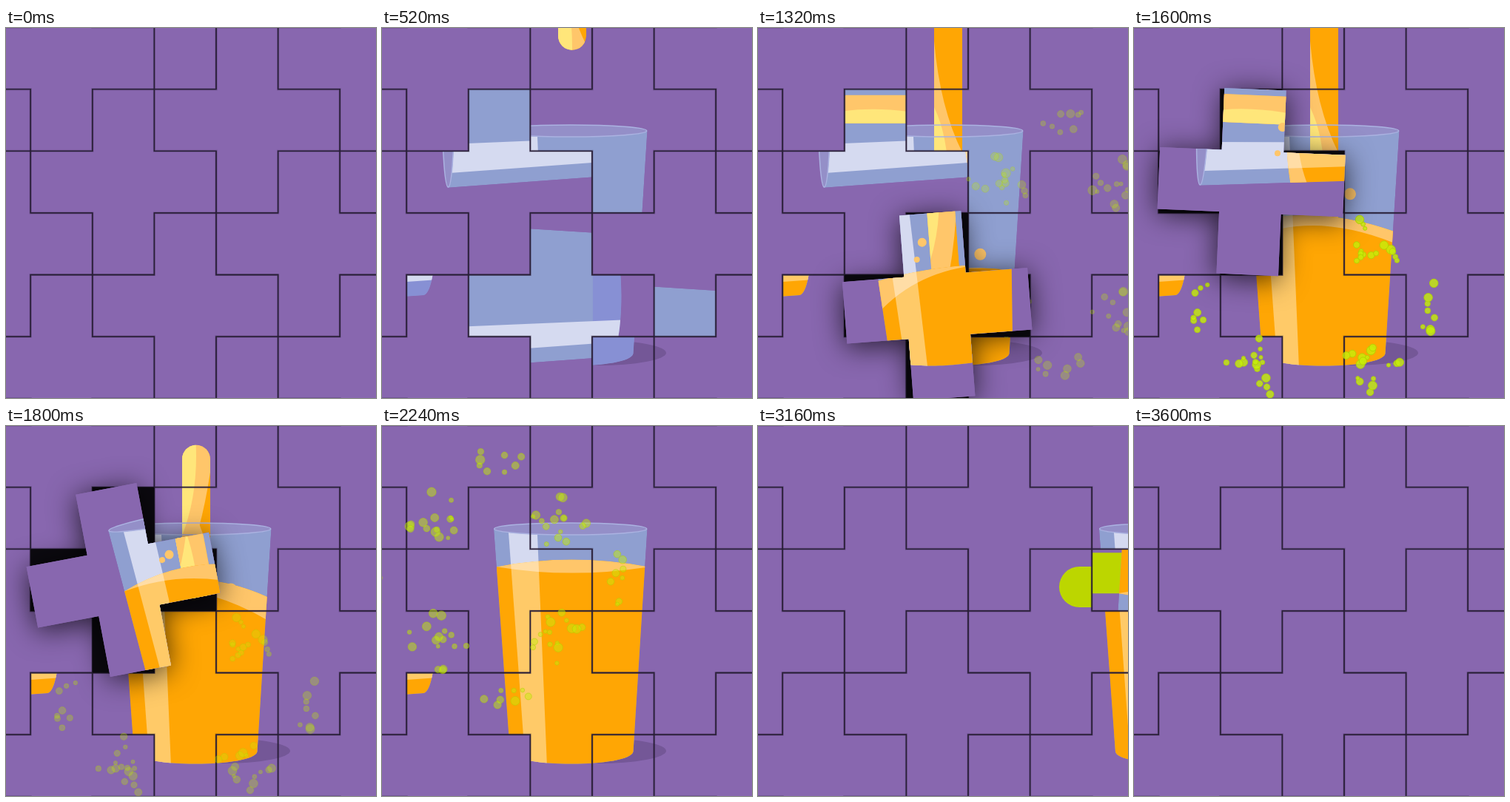
An HTML page with a canvas that plays this animation: 500 by 500 pixels, repeating every 3640 ms.

```html
<!DOCTYPE html>
<html>
<head>
<meta charset="utf-8">
<style>
html, body { margin: 0; height: 100%; overflow: hidden; background: #8867af; }
canvas { display: block; }
</style>
</head>
<body>
<canvas id="stage" width="500" height="500"></canvas>
<script>
const ctx = document.getElementById('stage').getContext('2d');
const LOOP = 3640, U = 83.6, TURN = 400;
const PURPLE = '#8867af', ORANGE = '#ffa604', LIGHT = '#ffc66a', YELLOW = '#ffe67a', LIME = '#bcd600';

const clamp = (v, a = 0, b = 1) => Math.min(b, Math.max(a, v));
const phase = (t, start, length) => clamp((t - start) / length);
const easeOut = p => 1 - (1 - p) ** 3;
const easeInOut = p => p < .5 ? 4 * p ** 3 : 1 - 4 * (1 - p) ** 3;
const random = n => { const s = Math.sin(n * 12.9898) * 43758.5453; return s - Math.floor(s); };

// Tile centre from lattice steps (2,-1) and (1,2).
const centre = (i, j) => ({ x: 158.6 + (2 * i + j) * U, y: 208.1 + (2 * j - i) * U });

const turning = [
  { ...centre(1, 1), start: 522 },
  { ...centre(0, 1), start: 1013 },
  { ...centre(0, 0), start: 1525 }
];
const fixed = [
  { ...centre(-1, 1), angle: -Math.PI / 2 },
  { ...centre(2, 1), angle: Math.PI }
];

function plus() {
  const h = U / 2, e = U * 1.5;
  ctx.beginPath();
  [[-h, -e], [h, -e], [h, -h], [e, -h], [e, h], [h, h], [h, e], [-h, e], [-h, h], [-e, h], [-e, -h], [-h, -h]]
    .forEach(p => ctx.lineTo(...p));
  ctx.closePath();
}

function at(x, y, angle, draw) {
  ctx.save();
  ctx.translate(x, y);
  ctx.rotate(angle);
  draw();
  ctx.restore();
}

function fill(color) {
  ctx.fillStyle = color;
  ctx.fill();
}

function stroke(color, width) {
  ctx.strokeStyle = color;
  ctx.lineWidth = width;
  ctx.stroke();
}

function ellipse(x, y, rx, ry, color) {
  ctx.beginPath();
  ctx.ellipse(x, y, rx, ry, 0, 0, 7);
  fill(color);
}

function pill(x, y, w, h, r) {
  ctx.beginPath();
  ctx.roundRect(x, y, w, h, r);
}

function glassPath() {
  ctx.beginPath();
  ctx.moveTo(151, 139);
  ctx.lineTo(173, 440);
  ctx.bezierCurveTo(176, 462, 336, 462, 339.5, 440);
  ctx.lineTo(358.5, 139);
  ctx.ellipse(254.7, 139, 103.7, 8, 0, 0, Math.PI, true);
}

function highlight(color) {
  ctx.beginPath();
  ctx.moveTo(171, 144);
  ctx.lineTo(210, 147);
  ctx.lineTo(223, 460);
  ctx.lineTo(194, 460);
  fill(color);
}

function glint(top, bottom) {
  const mid = (top + bottom) / 2;
  ctx.beginPath();
  ctx.moveTo(237, top);
  ctx.quadraticCurveTo(244, top + 100, 277, top + 165);
  ctx.lineTo(277, bottom - 150);
  ctx.quadraticCurveTo(264, bottom - 60, 237, bottom);
  fill(LIGHT);
  ctx.beginPath();
  ctx.moveTo(237, mid - 100);
  ctx.quadraticCurveTo(257, mid - 60, 257, mid);
  ctx.quadraticCurveTo(257, mid + 60, 237, mid + 110);
  fill(YELLOW);
}

function stream(t, level) {
  const head = 28 + 1.78 * (t - 520), tail = Math.max(-60, 24 + 1.78 * (t - 1800));
  const end = Math.min(head, level + 25);
  if (end <= tail) return;
  ctx.save();
  pill(238, tail, 38, end - tail, Math.min(19, (end - tail) / 2));
  ctx.clip();
  fill(ORANGE);
  glint(5, 405);
  if (t < 760) glint(head - 170, head + 160);
  if (t > 1700) glint(tail - 150, tail + 180);
  ctx.restore();
}

function juice(t, level) {
  const churn = 1 - phase(t, 1950, 300), shift = phase(t, 1400, 400);
  const tilt = 8 * churn * Math.sin(t / 150);
  const left = level + tilt, right = level - tilt;
  const surface = () => {
    ctx.beginPath();
    ctx.moveTo(155, left);
    ctx.quadraticCurveTo(255, level - 18 - 25 * churn * shift, 357, right);
  };
  ctx.save();
  surface();
  ctx.lineTo(357, 470);
  ctx.lineTo(155, 470);
  ctx.clip();
  fill(ORANGE);
  surface();
  ctx.lineTo(357, right + 32 * churn * shift);
  ctx.quadraticCurveTo(255 - 25 * churn * (1 - shift), level + 18 - 42 * churn, 155, left + 48 * churn * (1 - shift));
  fill(LIGHT);
  highlight('rgba(255,255,255,.4)');
  ctx.restore();
}

function glass(t) {
  const level = 190 + 265 * (1 - phase(t, 840, 1200)) ** 1.2;
  ellipse(292, 439, 92, 17, '#745797');
  if (t > 2280) {
    pill(97 + 620 * (1 - easeOut(phase(t, 2300, 380))), 190, 1500, 55, 27.5);
    fill(LIME);
  }
  ctx.save();
  glassPath();
  ctx.clip();
  fill('#8f9fd0');
  ctx.fillStyle = '#8790d4';
  ctx.fillRect(150, 418, 200, 50);
  highlight('#d5daf0');
  ctx.restore();
  ellipse(254.7, 139, 103, 8, '#948fc8');
  if (t > 490) stream(t, level);
  if (t > 840) {
    ctx.save();
    glassPath();
    ctx.clip();
    juice(t, level);
    ctx.restore();
  }
  if (t > 850 && t < 1850) {
    for (let i = 0; i < 3; i++) {
      const p = (t / 420 + i / 3) % 1;
      ellipse(255 + [-62, -36, 50][i] * (.5 + p / 2), level - 180 * p * (1 - p), 4 + i * 2, 4 + i * 2, LIGHT);
    }
  }
  ctx.beginPath();
  ctx.ellipse(254.7, 139, 103, 8, 0, 0, 7);
  stroke('#abb2e1', 1.5);
}

function scene(t) {
  ctx.fillStyle = PURPLE;
  ctx.fillRect(-400, -400, 1400, 1400);
  if (t < 40 || t > 3310) return;
  const enter = -460 * (1 - easeOut(phase(t, 40, 440)));
  const leave = 640 * phase(t, 2820, 490) ** 2;
  at(enter + leave, 0, 0, () => glass(t));
}

function tile({ x, y }, angle, t) {
  at(x, y, angle, () => {
    plus();
    ctx.clip();
    ctx.translate(-x, -y);
    scene(t);
  });
}

// Drops thrown outwards from every edge of a tile as it snaps home.
function splash({ x, y, start }, t) {
  const age = t - start - TURN;
  if (age < 0 || age > 500) return;
  ctx.globalAlpha = Math.min(1, 1.3 * (1 - age / 500));
  for (let i = 0; i < 96; i++) {
    const n = i + start, side = i % 3 - 1;
    const out = (22 + 32 * random(n)) * easeOut(Math.min(1, (age + 30) / 600));
    const along = (random(n + .3) - .5) * U;
    const size = 2.5 + 3.8 * random(n + .7);
    at(x, y, Math.floor(i / 3) % 4 * Math.PI / 2, () => {
      const px = side ? side * (U / 2 + out) : along;
      const py = side ? along - U : -1.5 * U - out;
      ellipse(px, py, size, size, '#c6ee0a');
      stroke('#aed000', 1);
    });
  }
  ctx.globalAlpha = 1;
}

function grid() {
  for (let i = -3; i <= 3; i++) {
    for (let j = -3; j <= 3; j++) {
      const c = centre(i, j);
      at(c.x, c.y, 0, () => {
        plus();
        stroke('rgba(35,25,50,.15)', 3);
        stroke('#2a2038', 1.3);
      });
    }
  }
}

function movingTile(part, angle, t) {
  at(part.x, part.y, 0, () => { plus(); fill('#0c0a10'); });
  at(part.x, part.y, angle, () => {
    plus();
    ctx.shadowColor = 'rgba(0,0,0,.75)';
    ctx.shadowBlur = 38;
    ctx.shadowOffsetY = 5;
    fill(PURPLE);
  });
  tile(part, angle, t);
}

function frame(now) {
  const t = now % LOOP;
  scene(t);
  const moving = [];
  fixed.forEach(part => tile(part, part.angle, t));
  turning.forEach(part => {
    const p = phase(t, part.start, TURN);
    const angle = -Math.PI / 2 * (1 - easeInOut(p));
    if (p > .05 && p < 1) moving.push([part, angle]);
    else if (p < 1) tile(part, angle, t);
  });
  grid();
  turning.forEach(part => splash(part, t));
  moving.forEach(([part, angle]) => movingTile(part, angle, t));
}

const begin = performance.now();
(function tick() {
  frame(performance.now() - begin);
  requestAnimationFrame(tick);
})();
</script>
</body>
</html>
```
